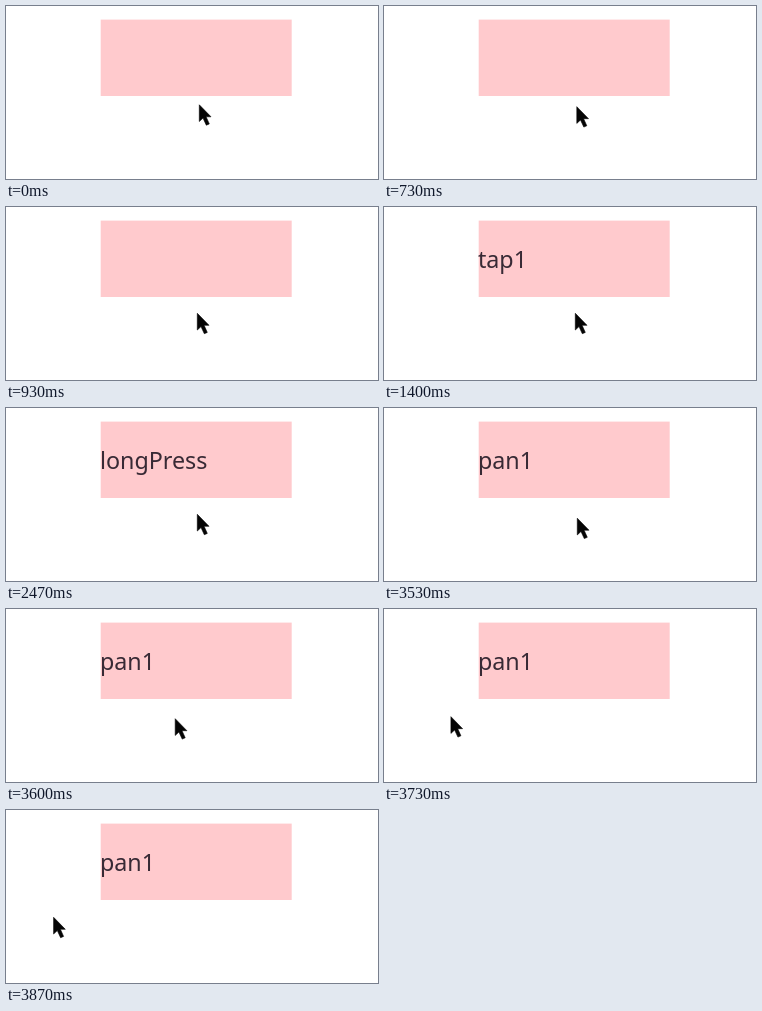
Recreate the animation shown at these times as an HTML page. Size 372x173 px, loop 4.74 s.

```html
<!DOCTYPE html>
<html lang="en">
<head>
<meta charset="utf-8">
<title>Gesture demo</title>
<style>
  html, body { margin: 0; width: 100%; height: 100%; overflow: hidden; background: #fff; }
  svg { display: block; width: 100%; height: 100%; }
  text { font: 300 23.3px "Noto Sans", sans-serif; fill: #382a35; }
</style>
</head>
<body>
<svg viewBox="0 0 372 173">
  <rect x="94.7" y="13.6" width="191" height="76.4" fill="#ffcacd"/>
  <text id="label" x="93.9" y="60.6"></text>
  <path id="cursor" d="M0.3 0.3V17L4 13.6L7.3 20.7L10.3 19.4L7.1 12.3H12Z"
    fill="#050505" stroke="#050505" stroke-width="0.6"/>
</svg>
<script>
const LOOP = 4740;
const FPS = 15;
const label = document.getElementById('label');
const cursor = document.getElementById('cursor');

const linear = u => u;
const inOut = u => u < 0.5 ? 4 * u ** 3 : 1 - 4 * (1 - u) ** 3;

// Times are counted in ticks of 1/15 s
const glides = [
  { from: 10, to: 14, x: 191, y: 106, ease: linear },
  { from: 47, to: 48, x: 198.3, y: 110, ease: linear },
  { from: 51.7, to: 58, x: 47.3, y: 107, ease: inOut }
];

function position(tick) {
  let x = 193, y = 98.5;
  for (const g of glides) {
    const u = Math.min(1, Math.max(0, (tick - g.from) / (g.to - g.from)));
    x += (g.x - x) * g.ease(u);
    y += (g.y - y) * g.ease(u);
  }
  return [x, y];
}

function message(tick) {
  if (tick < 21) return '';
  if (tick < 37) return 'tap1';
  return tick < 53 ? 'longPress' : 'pan1';
}

function render(ms) {
  // The small offset absorbs times rounded to 10 ms
  const tick = Math.floor((ms + 4) * FPS / 1000);
  label.textContent = message(tick);
  cursor.setAttribute('transform', `translate(${position(tick)})`);
}

const begin = performance.now();
function loop() {
  render((performance.now() - begin) % LOOP);
  requestAnimationFrame(loop);
}
loop();
</script>
</body>
</html>
```
